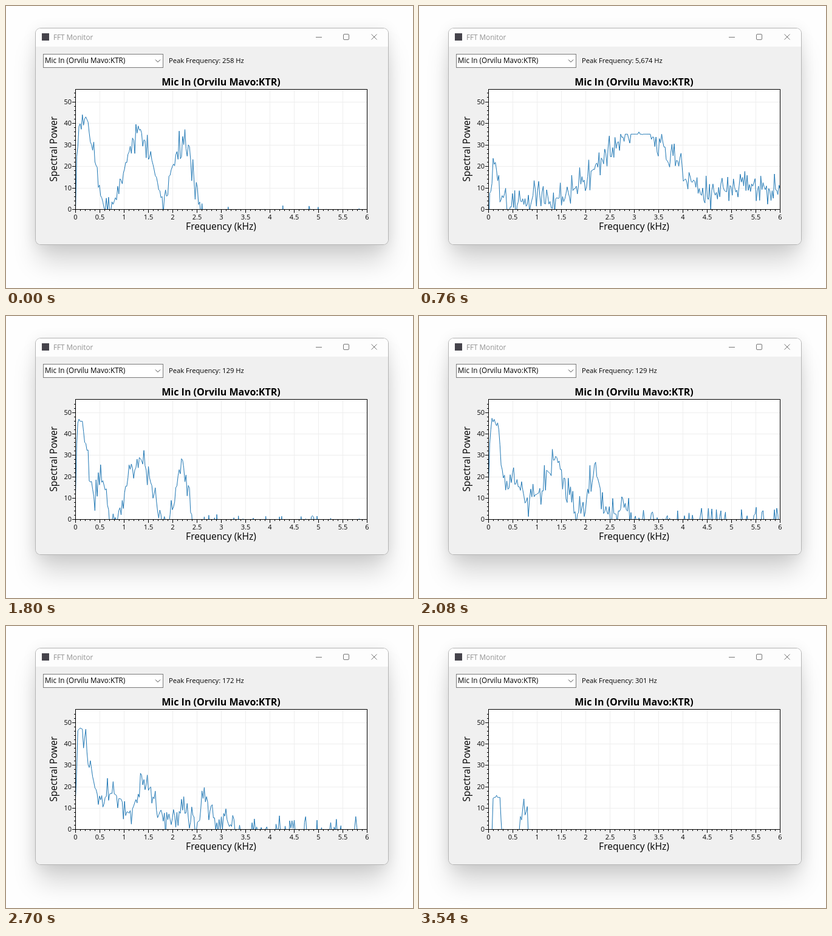
Write an HTML page that moves like this. It is 670 px wide and 465 px high and loops after 3610 ms.

```html
<!DOCTYPE html>
<html lang="en">
<head>
<meta charset="utf-8">
<title>FFT Monitor</title>
<style>
  html, body { margin: 0; width: 100%; height: 100%; overflow: hidden; background: #fefefe; }
  #window {
    position: absolute; left: 49px; top: 37px; width: 580px; height: 356px; border-radius: 8px;
    background: linear-gradient(#fdfdfd 30px, #f0f0f0 30px);
    box-shadow: 0 0 0 1px #b4b4b4, 0 32px 42px -4px rgba(0,0,0,.17), 0 2px 24px rgba(0,0,0,.09);
  }
  svg { position: absolute; left: 0; top: 0; font-family: "Open Sans", sans-serif; }
  .line { fill: none; stroke-width: 1; }
</style>
</head>
<body>
<div id="window"></div>
<svg width="670" height="465" viewBox="0 0 670 465">
  <rect x="59" y="45" width="12" height="12" fill="#45434b"/>
  <text x="78" y="56" font-size="11.7" fill="#939393">FFT Monitor</text>
  <path class="line" stroke="#777" d="M510 51.5h10M601.5 46.5l9 9m0-9l-9 9"/>
  <rect class="line" stroke="#777" x="555.5" y="46.5" width="9" height="9" rx="1.5"/>

  <rect x="61.5" y="79.5" width="197" height="22" fill="#fff" stroke="#7a7a7a"/>
  <text x="64" y="94" font-size="11.7">Mic In (Orvilu Mavo:KTR)</text>
  <path class="line" stroke="#444" d="M246 88.5l4 4 4-4"/>
  <text id="peak" x="268" y="94" font-size="11.2"></text>

  <text x="354" y="131" font-size="16" font-weight="bold" text-anchor="middle">Mic In (Orvilu Mavo:KTR)</text>
  <text x="354" y="369" font-size="15.6" text-anchor="middle">Frequency (kHz)</text>
  <text transform="translate(84 236) rotate(-90)" font-size="15.5" text-anchor="middle">Spectral Power</text>

  <clipPath id="clip"><rect x="114" y="137" width="481" height="199"/></clipPath>
  <rect x="114.5" y="137.5" width="480" height="198" fill="#fff"/>
  <g id="axes" font-size="11"></g>
  <path id="spectrum" class="line" stroke="#1f77b4" stroke-linejoin="round" clip-path="url(#clip)"/>
  <rect class="line" stroke="#000" x="114.5" y="137.5" width="480" height="198"/>
</svg>
<script>
const LEFT = 114.5, RIGHT = 594.5, TOP = 137.5, BASE = 335.5;
const LOOP = 3610, STEP = 69.4, RESCALE = 1380;
const BINS = 256, BIN_PX = (RIGHT - LEFT) / BINS, BIN_HZ = 42.983, ROUGH = 8, LOW_CUT = 28;

// A sound is a noise floor with formants [bin, power, width], the strongest first.
const sound = (time, floor, ...formants) => ({ time, floor, formants });
const sounds = [
  sound(0, -6, [6, 44, 14], [56, 36, 18], [93, 31, 14]),
  sound(760, 1, [132, 36, 48], [4, 21, 7], [42, 8, 6], [230, 11, 50]),
  sound(1240, -5, [9, 42, 18], [52, 33, 24], [86, 26, 22], [120, 9, 14]),
  sound(1800, -5, [3, 47, 12], [22, 20, 7], [56, 28, 16], [93, 21, 8]),
  sound(2410, 2, [4, 49, 12], [28, 22, 20], [60, 29, 13], [92, 22, 12], [118, 17, 14]),
  sound(2970, -5, [5, 47, 15], [34, 13, 14], [62, 14, 12], [113, 16, 4], [131, 8, 3]),
  sound(3540, -9, [7, 16, 6], [31, 15, 4]),
];

const $ = id => document.getElementById(id);
const mix = (a, b, p) => a + (b - a) * p;

// Mostly small values, now and then a spike.
function noise(bin, seed) {
  const n = Math.sin(bin * 78.233 + seed * 12.9898) * 43758.5453;
  const r = (n - Math.floor(n)) * 2 - 1;
  return r * Math.abs(r);
}

// The strongest formant is exact; every other bin is rough and stays below it.
function power({ floor, formants }, bin, seed) {
  const [peakBin, peakPower] = formants[0];
  if (bin === peakBin) return peakPower;
  const bumps = formants.map(([center, height, width]) =>
    mix(floor, height, Math.exp(-(((bin - center) / width) ** 2))));
  const level = Math.max(...bumps) - LOW_CUT * Math.exp(-bin) + ROUGH * noise(bin, seed);
  return Math.min(peakPower - 1, level);
}

function drawAxes(scale) {
  let grid = '', ticks = '', labels = '';
  for (let i = 0; i <= 60; i++) {
    const x = LEFT + i * 8, major = i % 5 === 0;
    ticks += `M${x} ${BASE}v${major ? 5.5 : 2.5}`;
    if (!major) continue;
    grid += `M${x} ${TOP}V${BASE}`;
    labels += `<text x="${x}" y="352" text-anchor="middle">${i / 10}</text>`;
  }
  for (let v = 0; v <= 54; v += 2) {
    const y = Math.round(BASE - v * scale - 0.5) + 0.5, major = v % 10 === 0;
    ticks += `M${LEFT} ${y}h${major ? -5.5 : -2.5}`;
    if (!major) continue;
    grid += `M${LEFT} ${y}H${RIGHT}`;
    labels += `<text x="108" y="${y + 3.5}" text-anchor="end">${v}</text>`;
  }
  $('axes').innerHTML =
    `<path class="line" stroke="#eee" d="${grid}"/>
     <path class="line" stroke="#000" d="${ticks}"/>${labels}`;
}

function drawSpectrum(levels, scale) {
  const peak = levels.indexOf(Math.max(...levels));
  $('spectrum').setAttribute('d', 'M' + levels.map((v, bin) =>
    `${LEFT + bin * BIN_PX} ${(BASE - v * scale).toFixed(1)}`).join('L'));
  $('peak').textContent =
    `Peak Frequency: ${Math.round(peak * BIN_HZ).toLocaleString('en-US')} Hz`;
}

let shownScale, shownSeed;

function draw(t) {
  const k = sounds.findLastIndex(s => s.time <= t);
  const from = sounds[k], to = sounds[(k + 1) % sounds.length];
  const span = (to.time || LOOP) - from.time, steps = Math.round(span / STEP);
  const step = Math.floor((t - from.time) / span * steps);
  const scale = t < RESCALE ? 3.55 : 3.52;
  const seed = k * 100 + step;

  if (scale !== shownScale) drawAxes(scale);
  if (scale !== shownScale || seed !== shownSeed) {
    const levels = Array.from({ length: BINS + 1 }, (_, bin) =>
      mix(power(from, bin, seed), power(to, bin, seed), step / steps));
    drawSpectrum(levels, scale);
  }
  shownScale = scale;
  shownSeed = seed;
}

const start = performance.now();
function tick() {
  draw((performance.now() - start) % LOOP);
  requestAnimationFrame(tick);
}
tick();
</script>
</body>
</html>
```
